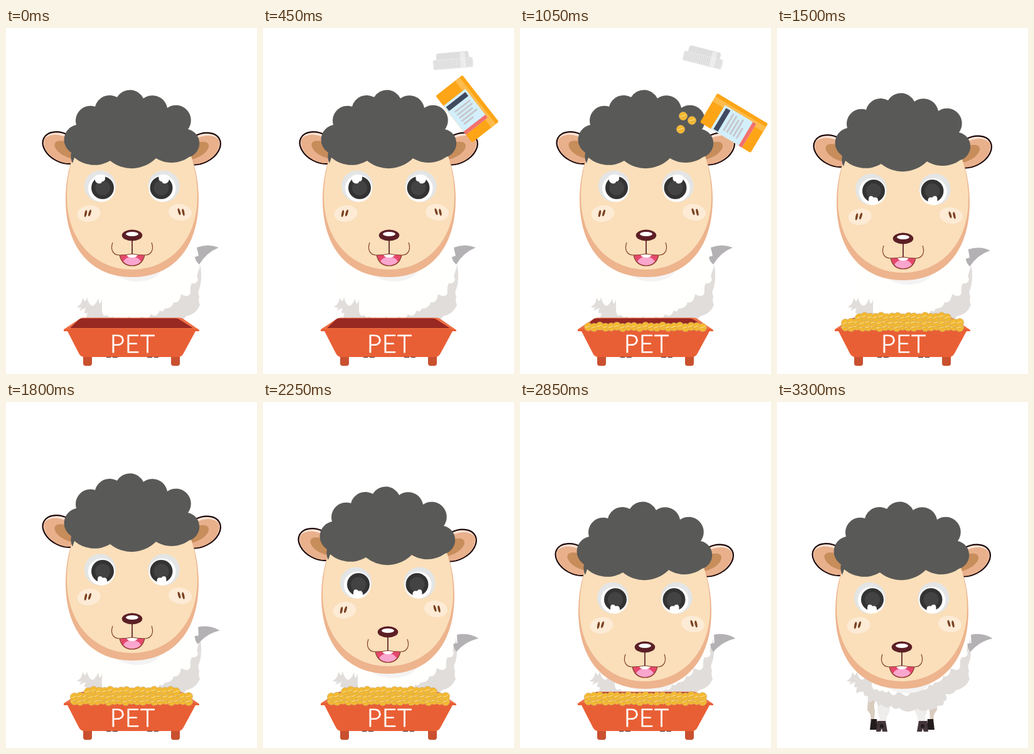
These frames come from a looping animation (400 by 550 pixels, 3450 ms). An HTML page:

```html
<!DOCTYPE html>
<html lang="en">
<head>
<meta charset="utf-8">
<title>Hungry sheep</title>
<style>
html, body { margin: 0; width: 100%; height: 100%; overflow: hidden; background: #fff; }
svg { display: block; width: 100%; height: 100%; }
</style>
</head>
<body>
<svg viewBox="0 0 400 550">
  <defs>
    <g id="ear">
      <ellipse rx="33.500" ry="22.500" fill="#fde3d6" stroke="#1c0606" stroke-width="2.200"/>
      <path d="M-32 1C-28-14-10-19 8-18S31-8 32 2C30 15 15 21.400 0 21.400S-29 14-32 1Z" fill="#e9b08c"/>
      <ellipse cx="8" cy="-1" rx="22" ry="11" fill="#c78d5b"/>
    </g>
    <g id="eye">
      <circle cx="150" cy="251.500" r="25" fill="#e3e5e6"/>
      <circle cx="152.500" cy="255" r="21.500" fill="#fff"/>
      <circle cx="154" cy="254" r="18" fill="#333"/>
      <circle cx="154" cy="254" r="12" fill="#434343"/>
    </g>
    <path id="glintUp" d="M141 236Q149 230 158 235V240A5 5 0 0 1 153 244Q152 248 147 247Q141 246 141 236Z" fill="#fff"/>
    <path id="glintDown" d="M146 274V267Q146 262 150 262Q153 262 154 264.500Q161 263 161 269V273Q154 276 146 274Z" fill="#fff"/>
    <g id="blush">
      <ellipse cx="132" cy="295" rx="18.500" ry="13" transform="rotate(-8 132 295)" fill="#fdebd6"/>
      <g fill="#7b4222">
        <ellipse cx="127" cy="295" rx="1.800" ry="5.500" transform="rotate(12 127 295)"/>
        <ellipse cx="133.500" cy="294" rx="1.800" ry="5.500" transform="rotate(17 133.500 294)"/>
      </g>
    </g>
    <g id="pellet">
      <circle r="6.500" fill="#f5b92e" stroke="#cfae6c" stroke-width=".8"/>
      <path d="M-4.500 1.500L4.500-1.500" stroke="#fbdc86" stroke-width="1.600"/>
      <path d="M-4.500 2.600L4.500-.4" stroke="#d39a2a" stroke-width=".7"/>
    </g>
    <g id="legs">
      <path d="M147 472H160Q155 482 158 490L157 506H151Q153 496 146 490Z" fill="#d9ccbe"/>
      <path d="M162 480H182Q183 492 177 500L176 510H164Q167 500 162 494Z" fill="#efedeb"/>
      <path d="M152 504H161L163 521H150Z" fill="#231c1d"/>
      <path d="M162 507H175L178 524H170L169 519L167 524H160Z" fill="#43353a"/>
      <circle cx="169" cy="515" r="3" fill="#231c1d"/>
    </g>
  </defs>

  <g id="body">
    <use href="#legs"/>
    <use href="#legs" transform="matrix(-1 0 0 1 403 0)"/>
    <path d="M128 400L124 428Q120 434 122 429Q121 440 113 443Q118 446 121 443Q116 450 118 449Q124 446 127 445Q122 456 130 453Q127 460 129 463Q136 459 140 461Q140 470 147 467Q146 476 149 478Q157 472 161 477Q163 486 168 481Q178 489 184 483Q190 491 196 486Q204 493 213 492Q222 490 225 487Q236 494 242 489Q254 490 258 483Q271 483 267 476Q276 474 270 464Q282 467 287 458Q303 455 309 440Q306 434 308 427Q305 420 308 415Q313 400 310 379L302 370Z" fill="#e0dddb"/>
    <path d="M124 365L122 428Q127 440 129 428Q133 444 140 441Q145 436 147 430Q149 446 153 431V450Q155 461 161 456Q166 463 170 458Q176 465 180 459Q187 470 192 464L196 458Q205 470 212 466L216 458Q226 466 231 455Q240 462 245 449Q250 453 253 446Q265 446 267 436Q277 438 279 423Q291 430 294 421Q293 411 296 406Q305 407 306 399Q303 396 306 388L309 380L303 360Z" fill="#fffffd"/>
  </g>

  <path id="tail" d="M304 349Q322 342 339 349Q319 357 308 376Q302 371 301 364L307 362Z" fill="#b3b1b3"/>

  <g id="head">
    <ellipse cx="209" cy="381" rx="39" ry="22" fill="#f4f3f3"/>
    <use href="#ear" transform="translate(90 190.500) rotate(28)"/>
    <use href="#ear" transform="translate(310.500 192) rotate(-28) scale(-1 1)"/>
    <path d="M95 272A106 150 0 0 1 307 272C307 352 264 396 201 396S95 352 95 272Z" fill="#edb48e"/>
    <path d="M97 268A104 150 0 0 1 305 268C305 338 260 384 201 384S97 338 97 268Z" fill="#fadfba"/>
    <path d="M104 198A24 24 0 0 1 112 154A23.500 23.500 0 0 1 142 125A24 24 0 0 1 177 110A24 24 0 0 1 219 112A24 24 0 0 1 257 127A24 24 0 0 1 290 161A22.700 22.700 0 0 1 292 205A48 48 0 0 1 239 207A54.500 54.500 0 0 1 166 211A49 49 0 0 1 109 206L106 215Q102 208 104 198Z" fill="#595957"/>
    <use href="#eye"/>
    <use href="#eye" transform="matrix(-1 0 0 1 401.500 0)"/>
    <g id="lookUp">
      <use href="#glintUp"/>
      <use href="#glintUp" transform="matrix(-1 0 0 1 401.500 0)"/>
    </g>
    <g id="lookDown">
      <use href="#glintDown"/>
      <use href="#glintDown" transform="matrix(-1 0 0 1 401.500 0)"/>
    </g>
    <use href="#blush"/>
    <use href="#blush" transform="matrix(-1 0 0 1 409.500 -2)"/>
    <path d="M201 337V361" stroke="#5b2024" stroke-width="1.700"/>
    <ellipse cx="201" cy="329.500" rx="16.300" ry="9" fill="#5b1f25"/>
    <ellipse cx="201" cy="327.500" rx="10" ry="3.500" fill="#fff"/>
    <path d="M181 361Q192 361 201 359Q210 361 221 361Q217 378 201 378Q185 378 181 361Z" fill="#e5486c"/>
    <path d="M187 371Q192 363 201 364Q210 363 215 371Q210 377 201 377Q192 377 187 371Z" fill="#f9a6cf"/>
    <path d="M192 360.500Q201 358.500 210 360.500Q208 365 201 365Q194 365 192 360.500Z" fill="#fff"/>
    <path d="M170 341C166 352 170 361 181 361Q192 361 201 359Q210 361 221 361C232 361 236 352 232 341M181 361Q185 378 201 378Q217 378 221 361" fill="none" stroke="#85432c" stroke-width="1.200"/>
  </g>

  <g id="bowl">
    <rect x="123" y="515" width="14" height="22" rx="4" fill="#c9502f"/>
    <rect x="263" y="515" width="14" height="22" rx="4" fill="#c9502f"/>
    <path d="M92 482V479L118 462Q120 460.500 123 460.500H277Q280 460.500 282 462L308 480V482Z" fill="#ee7047"/>
    <path d="M102 477L116 463.500Q118 461.500 122 461.500H270Q274 461.500 276 463L298 477Z" fill="#982822"/>
    <path d="M92 482Q93 478 98 478H302Q307 478 308 482H302L283 517Q280 523 274 523H125Q119 523 116 517L98 482Z" fill="#e95f35"/>
    <text x="202" y="516" text-anchor="middle" font-family="Lato, 'Open Sans', sans-serif" font-weight="300" font-size="40" letter-spacing="1" fill="#fff" stroke="#fff" stroke-width=".8" stroke-linejoin="round">PET</text>
    <g id="food"></g>
  </g>

  <g id="drops">
    <use href="#pellet" x="260" y="140"/>
    <use href="#pellet" x="274" y="147"/>
    <use href="#pellet" x="256" y="161"/>
  </g>

  <g id="bottle">
    <rect x="-27" y="-47" width="54" height="94" rx="2" fill="#fda516"/>
    <rect x="12" y="-47" width="9" height="94" fill="#fdbb4c"/>
    <rect x="-27" y="-27" width="44" height="58" fill="#d3effb"/>
    <rect x="-25" y="-23" width="39" height="8" fill="#3f4a60"/>
    <path d="M-19-8H12M-19-2H12M-19 4H8M-19 10H12M-19 16H0" stroke="#c6c8cc" stroke-width="3"/>
    <rect x="-27" y="25" width="44" height="6" fill="#f3716d"/>
  </g>
  <g id="lid">
    <rect x="-26" y="-13" width="52" height="14" rx="4" fill="#dedede"/>
    <rect x="-32" y="-3" width="64" height="16" rx="3" fill="#e6e6e6"/>
    <path d="M-29 5H30" stroke="#d6d6d6" stroke-width="13" stroke-dasharray="1 2"/>
    <rect x="12" y="-12" width="8" height="24" fill="#fff" opacity=".4"/>
  </g>
</svg>
<script>
const STEP = 150, LOOP = 3450;
const $ = id => document.getElementById(id);
const show = (id, on) => $(id).setAttribute('display', on ? 'inline' : 'none');
const place = (id, x, y, turn = 0, pivot = '') =>
  $(id).setAttribute('transform', `translate(${x} ${y}) rotate(${turn} ${pivot})`);

// x, y and angle per step while the bottle is on stage
const bottlePose = [[321.5, 129.5, 0], [324, 122, -30], [325.5, 128.5, -38], [329, 133.5, -40],
  [329, 139.5, -44], [341, 143, -57], [341, 151, -59], [341, 151, -59], [341, 151, -59]];
const lidPose = [[321.5, 69.5, 0], [302.5, 50, -5], [302.5, 51.5, -5], [303, 49, -5],
  [303, 37, -5], [292.5, 40, 14], [292.5, 46, 14], [292.5, 38, 14], [292.5, 48, 14]];
const headDrop = [5, 10, 15, 20, 26, 36, 46, 54, 60];

// Three layers of pellets, bottom first: first x, last x, y
const layers = [[109, 291, 475], [109, 291, 468], [131, 271, 459.5]].map(([from, to, y], row) => {
  const layer = document.createElementNS('http://www.w3.org/2000/svg', 'g');
  const count = Math.round((to - from) / 9);
  for (let i = 0; i <= count; i++) {
    const px = from + (to - from) * i / count;
    const py = y + 1.2 * Math.sin(i * 2.3 + row);
    layer.innerHTML += `<use href="#pellet" x="${px}" y="${py}"/>`;
  }
  $('food').append(layer);
  return layer;
});

function draw(now) {
  const n = Math.floor(now % LOOP / STEP);
  const pouring = n >= 1 && n <= 9;
  show('bottle', pouring);
  show('lid', pouring);
  if (pouring) {
    place('bottle', ...bottlePose[n - 1]);
    place('lid', ...lidPose[n - 1]);
  }
  show('drops', n >= 7 && n <= 9);

  const drop = n < 10 ? 0 : headDrop[Math.min(n - 10, 8)];
  const shift = n >= 15 ? -2 : 0;
  const sag = Math.min(drop, 36);
  place('head', shift, drop);
  place('body', shift, 0);
  place('tail', sag * .14, sag * .58, Math.min(sag * .6, 10), '304 349');
  show('lookUp', n < 10);
  show('lookDown', n >= 10);

  const full = n < 19 ? n - 6 : 21 - n;
  layers.forEach((layer, i) => layer.setAttribute('display', i < full ? 'inline' : 'none'));
  show('bowl', n < 22);
  requestAnimationFrame(draw);
}
draw(performance.now());
</script>
</body>
</html>
```
